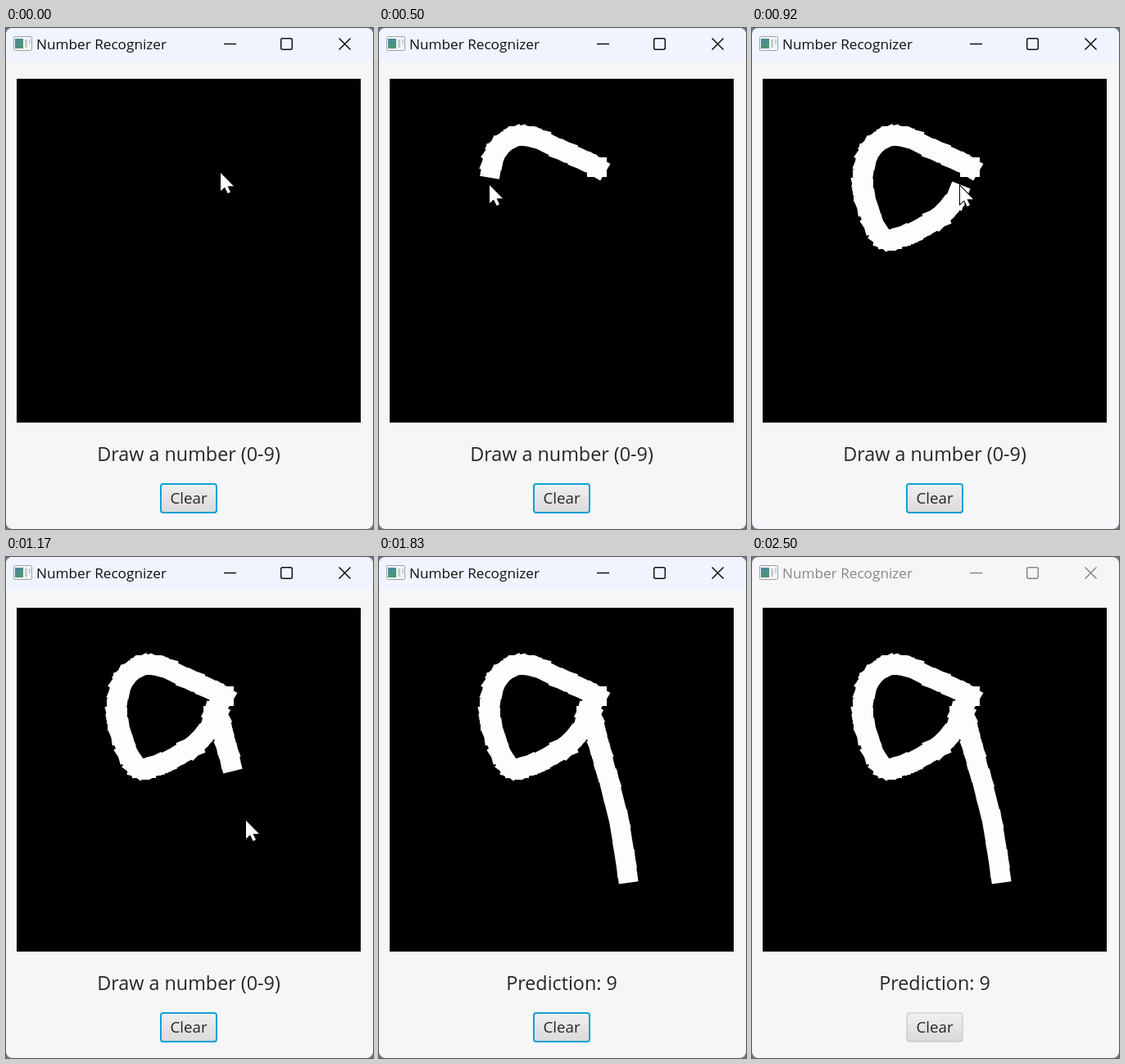
Animation, 448 px wide and 612 px high, one loop 2580 ms. Source, as an HTML page:

```html
<!DOCTYPE html>
<html lang="en">
<head>
<meta charset="utf-8">
<title>Number Recognizer</title>
<style>
  html, body { margin: 0; width: 100%; height: 100%; overflow: hidden; background: #6d7b88; }
  svg { display: block; width: 448px; height: 612px; }
  text { font-family: "Open Sans", "Noto Sans", sans-serif; fill: #262626; }
  .title { font-size: 17.2px; fill: #111; }
  .label { font-size: 23.35px; text-anchor: middle; }
  .button { font-size: 18.7px; text-anchor: middle; }
  .controls { fill: none; stroke: #111; stroke-width: 1.5; }
</style>
</head>
<body>
<svg viewBox="0 0 448 612">
  <defs>
    <linearGradient id="face" x1="0" y1="0" x2="0" y2="1">
      <stop offset="0" stop-color="#f0f0f0"/>
      <stop offset="1" stop-color="#d9d9db"/>
    </linearGradient>
    <linearGradient id="pane" x1="0" y1="0" x2="1" y2="1">
      <stop offset="0" stop-color="#4a86a8"/>
      <stop offset="1" stop-color="#4f9a62"/>
    </linearGradient>
    <clipPath id="frame"><rect width="448" height="612" rx="8"/></clipPath>
  </defs>

  <g clip-path="url(#frame)">
    <rect width="448" height="612" fill="#f6f6f9"/>
    <rect id="bar" width="448" height="40" fill="#eff4fe"/>
  </g>

  <rect x="9.5" y="10.5" width="22" height="17" rx="1" fill="#f4f6f6" stroke="#9aa3a6"/>
  <rect x="11" y="13" width="10" height="12" fill="url(#pane)"/>
  <path d="M23 14h3v10h-3zM28 14h2v6h-2z" fill="#c3cfd4"/>
  <g id="caption">
    <text class="title" x="37" y="26">Number Recognizer</text>
    <g class="controls">
      <path d="M266 19.5H281M406.5 12.5L420.5 26.5M420.5 12.5L406.5 26.5"/>
      <rect x="335.7" y="12.7" width="13.6" height="13.6" rx="2"/>
    </g>
  </g>

  <rect x="13" y="62" width="420" height="420"/>
  <path id="ink" fill="none" stroke="#fdfcff" stroke-width="24" stroke-linecap="square"/>

  <text id="label" class="label" x="223" y="529"></text>
  <rect id="focus" x="189" y="557" width="68" height="35" rx="3" fill="url(#face)"/>
  <text class="button" x="223" y="581">Clear</text>

  <path id="cursor" d="M0 0V22L5 17.4L8.6 25L12 23.4L8.6 16.2H16Z"
        fill="#fdfcff" stroke="#000" stroke-width="2" paint-order="stroke"/>
</svg>

<script>
const LOOP = 2580;
const BEAT = 83.3;   // ms between picture changes
const LAG = 0.6;     // beats by which the ink trails the pointer
const $ = id => document.getElementById(id);

// Pointer path as x, y, beat; the button goes down at the second point
const keys = [
  [262, 177, 0], [266, 170, 1], [220, 148, 2.8], [182, 132, 3.8],
  [153, 140, 4.6], [138, 165, 5.2], [137, 204, 6.3], [158, 254, 7.1],
  [188, 253, 7.8], [212, 241, 8.65], [232, 228, 9.1], [250, 206, 10.2],
  [257, 190, 11.8], [274, 250, 13.4], [293, 322, 14], [303, 386, 14.6]
];
const [DOWN, UP] = [keys[1][2], keys[keys.length - 1][2]];

const spline = (a, b, c, d, t) =>
  b + t / 2 * (c - a + t * (2 * a - 5 * b + 4 * c - d + t * (3 * (b - c) + d - a)));

function path(beat) {
  const last = keys.length - 1;
  if (beat >= UP) return keys[last].slice(0, 2);
  const i = keys.findIndex(k => k[2] > beat) - 1;
  const [a, b, c, d] = [i - 1, i, i + 1, i + 2]
    .map(j => keys[Math.max(0, Math.min(last, j))]);
  const t = (beat - b[2]) / (c[2] - b[2]);
  return [0, 1].map(j => spline(a[j], b[j], c[j], d[j], t));
}

function pointer(beat) {
  if (beat < 17) return path(beat);
  const t = Math.min(1, (beat - 17) / 4);
  return [303 - 7 * t, 386 + 127 * t * (0.6 + 0.4 * t)];
}

// Separate dashes between whole pixels give the ragged edge
function buildDashes() {
  let prev = path(DOWN);
  const dashes = [{ beat: DOWN, d: `M${prev}h0` }];
  for (let k = DOWN * 10 + 1; k <= UP * 10; k++) {
    const p = path(k / 10).map(Math.round);
    if (Math.hypot(p[0] - prev[0], p[1] - prev[1]) < 4) continue;
    dashes.push({ beat: k / 10, d: `M${prev}L${p}` });
    prev = p;
  }
  return dashes;
}
const dashes = buildDashes();

function draw(ms) {
  const beat = Math.floor((ms + 7) / BEAT);
  const inked = dashes.filter(s => s.beat <= beat - LAG + 1e-6);
  $("ink").setAttribute("d", inked.map(s => s.d).join(""));
  $("cursor").setAttribute("transform", `translate(${pointer(beat).map(Math.round)})`);
  $("cursor").style.display = beat < 22 ? "" : "none";
  $("label").textContent = beat < 16 ? "Draw a number (0-9)" : "Prediction: 9";

  const fade = Math.max(0, Math.min(1, (beat - 28) / 2));
  $("bar").style.opacity = 1 - fade;
  $("caption").style.opacity = 1 - 0.52 * fade;
  $("focus").style.stroke = fade ? "#c0c0c0" : "#12a0d6";
  $("focus").style.strokeWidth = fade ? 1 : 2;
}

const start = performance.now();
function tick() {
  draw((performance.now() - start) % LOOP);
  requestAnimationFrame(tick);
}
tick();
</script>
</body>
</html>
```
